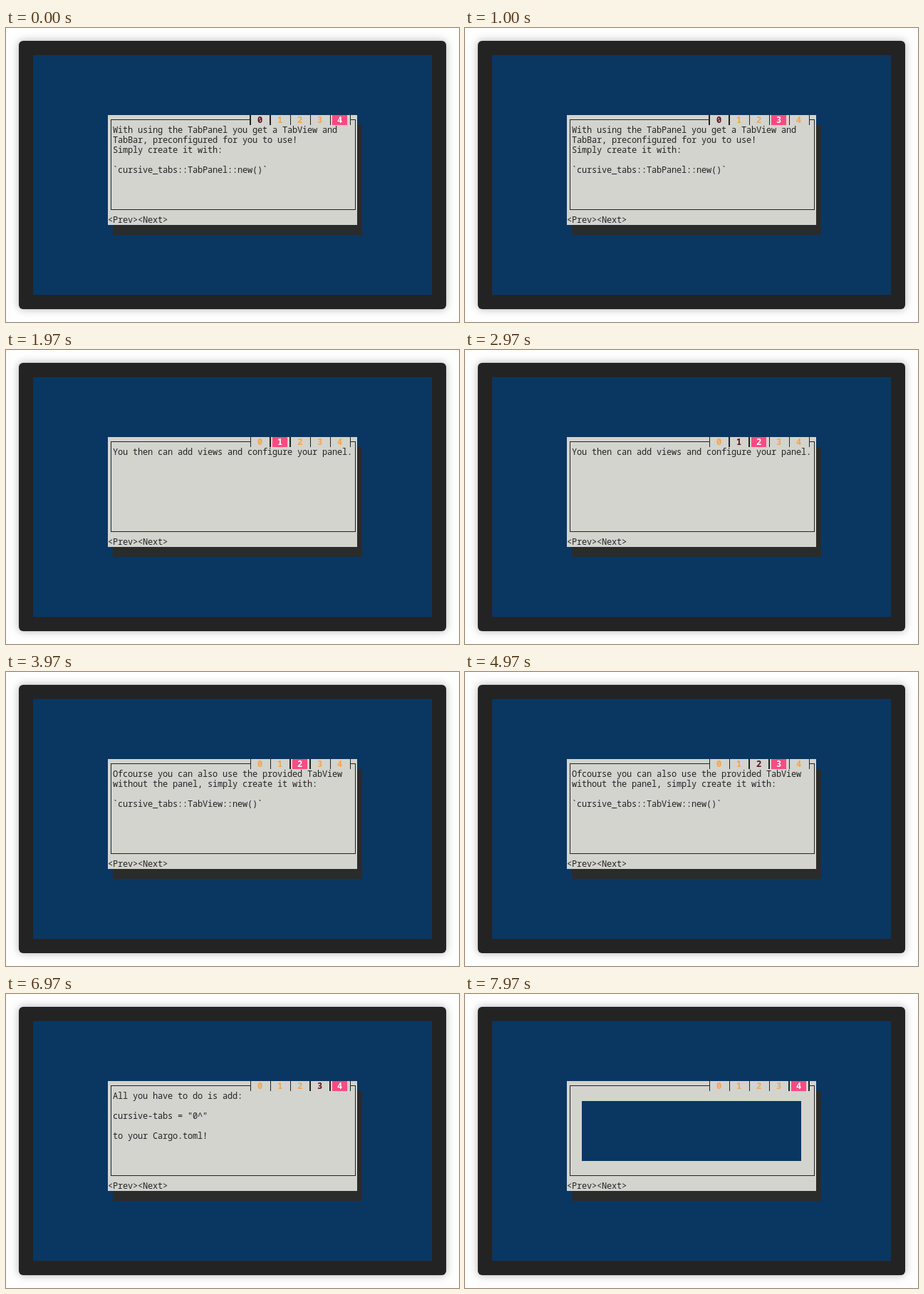
Recreate the animation shown at these times as an HTML page with a canvas. Size 636 by 412 pixels, loop 8000 ms.

```html
<!DOCTYPE html>
<html lang="en">
<head>
<meta charset="utf-8">
<title>Tab panel demo</title>
<style>
  html, body { margin: 0; width: 100%; height: 100%; overflow: hidden; background: #fefefe; }
  #window {
    position: absolute; left: 18px; top: 18px; width: 600px; height: 376px;
    border-radius: 6px; background: #232323; box-shadow: 0 0 12px rgba(0, 0, 0, .3);
  }
  canvas { position: absolute; left: 20px; top: 20px; }
</style>
</head>
<body>
<div id="window"><canvas id="term" width="560" height="336"></canvas></div>
<script>
const ctx = document.getElementById("term").getContext("2d");
const CW = 7, CH = 14, LEFT = 15, TOP = 6;   // cell size, panel position in cells
const FONT = '12px "Roboto Mono", "Noto Sans Mono", monospace';
const BLUE = "#0a3662", GREY = "#d3d4ce", INK = "#232323", SHADE = "#2a2b2b",
      PINK = "#fc4a82", ORANGE = "#f6a348", RED = "#5c0f1c";
const LOOP = 8000;

const pages = [
  ["With using the TabPanel you get a TabView and",
   "TabBar, preconfigured for you to use!",
   "Simply create it with:",
   "",
   "`cursive_tabs::TabPanel::new()`"],
  ["You then can add views and configure your panel."],
  ["Ofcourse you can also use the provided TabView",
   "without the panel, simply create it with:",
   "",
   "`cursive_tabs::TabView::new()`"],
  ["All you have to do is add:", "", 'cursive-tabs = "0^"', "", "to your Cargo.toml!"],
  []
];

// start time, open tab, hovered tab
const steps = [
  [0, 0, 4], [1000, 0, 3], [1150, 0, 2], [1300, 0, 1],
  [1970, 1, 1], [2970, 1, 2], [3970, 2, 2], [4970, 2, 3],
  [5970, 3, 3], [6970, 3, 4], [7970, 4, 4]
];

function rect(x, y, w, h, color) {
  ctx.fillStyle = color;
  ctx.fillRect(x, y, w, h);
}

function cells(col, row, w, h, color) {
  rect((LEFT + col) * CW, (TOP + row) * CH, w * CW, h * CH, color);
}

function write(text, col, row, color = INK, weight = "") {
  ctx.font = weight + " " + FONT;
  ctx.fillStyle = color;
  [...text].forEach((ch, i) =>
    ctx.fillText(ch, (LEFT + col + i) * CW, (TOP + row) * CH + 11));
}

const midX = col => (LEFT + col) * CW + 4;
const midY = row => (TOP + row) * CH + 7;

function hline(from, to, row) {
  rect(midX(from), midY(row) - 1, midX(to) - midX(from) + 1, 1, INK);
}

function border() {
  const top = midY(0) - 1, height = midY(9) - top;
  rect(midX(0), top, 1, height, INK);
  rect(midX(49), top, 1, height, INK);
  hline(0, 28, 0);
  hline(48, 49, 0);
  hline(0, 49, 9);
}

function tabs(open, hover) {
  for (let i = 0; i < 6; i++) {
    const heavy = i === open || i === open + 1;
    rect(midX(28 + 4 * i) - heavy, TOP * CH, heavy ? 2 : 1, CH, INK);
  }
  for (let i = 0; i < 5; i++) {
    if (i === hover) cells(29 + 4 * i, 0, 3, 1, PINK);
    const color = i === hover ? "#fff" : i === open ? RED : ORANGE;
    write(String(i), 30 + 4 * i, 0, color, "bold");
  }
}

function draw(now) {
  const t = now % LOOP;
  const [, open, hover] = steps.findLast(s => s[0] <= t);
  rect(0, 0, 560, 336, BLUE);
  cells(1, 1, 50, 11, SHADE);
  cells(0, 0, 50, 11, GREY);
  border();
  tabs(open, hover);
  pages[open].forEach((line, i) => write(line, 1, 1 + i));
  if (open === 4) cells(3, 2, 44, 6, BLUE);
  write("<Prev><Next>", 0, 10);
}

const start = performance.now();
function tick() {
  draw(performance.now() - start);
  requestAnimationFrame(tick);
}
tick();
</script>
</body>
</html>
```
